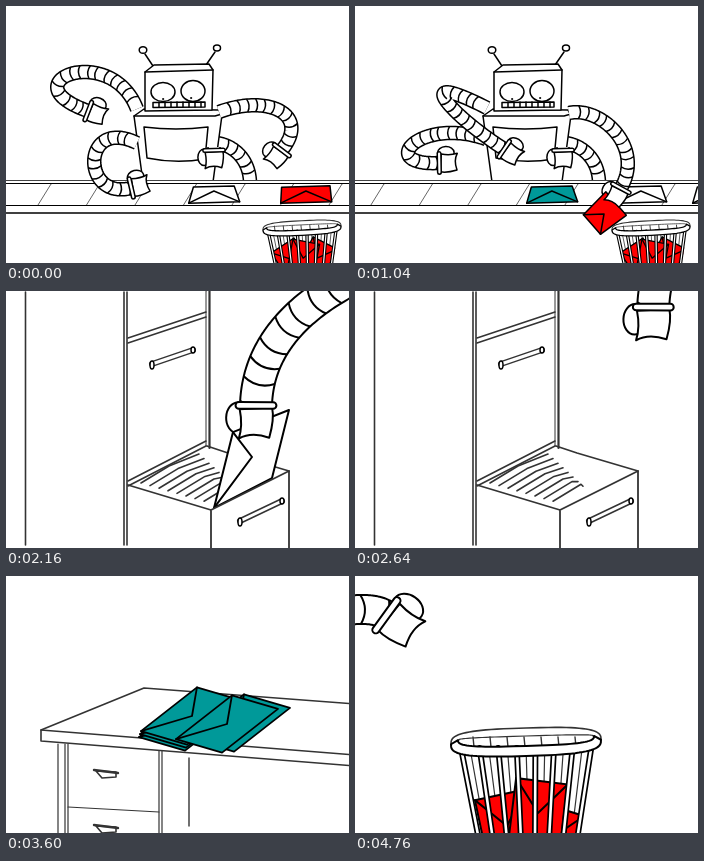
An HTML page with a canvas for the animation above (4840 ms loop, 343x257 px).

```html
<!DOCTYPE html>
<html lang="en">
<head>
<meta charset="utf-8">
<title>Sorting robot</title>
<style>
html, body { margin: 0; width: 100%; height: 100%; overflow: hidden; background: #fff; }
canvas { display: block; width: 100vw; height: 100vh; }
</style>
</head>
<body>
<canvas id="stage" width="343" height="257"></canvas>
<script>
const ctx = document.getElementById('stage').getContext('2d');
const LOOP = 4840, CABINET = 1760, DESK = 2880, BIN = 3720;
const RED = '#f00', TEAL = '#099', WHITE = '#fff', INK = '#000', GREY = '#333';

// ---------- motion helpers ----------
const mix = (a, b, k) => a.map((v, i) => v + (b[i] - v) * k);
const shift = (p, dx, dy) => p.map((v, i) => v + (i % 2 ? dy : dx));

function ease(t, from, to) {
  const k = Math.max(0, Math.min(1, (t - from) / (to - from)));
  return k * k * (3 - 2 * k);
}

// Eases through a series of moves, each given as [from, to, values].
const blend = (t, start, ...moves) =>
  moves.reduce((now, [from, to, goal]) => mix(now, goal, ease(t, from, to)), start);

// ---------- drawing helpers ----------
function trace(p) {
  ctx.beginPath();
  for (let i = 0; i < p.length; i += 2) ctx.lineTo(p[i], p[i + 1]);
}
function stroke(w, color = INK) {
  ctx.lineWidth = w;
  ctx.strokeStyle = color;
  ctx.stroke();
}
function paint(fill, w, color) {
  ctx.closePath();
  ctx.fillStyle = fill;
  ctx.fill();
  stroke(w, color);
}
function path(p, w = 1.5, color = INK) { trace(p); stroke(w, color); }
function shape(p, fill = WHITE, w = 1.5, color = INK) { trace(p); paint(fill, w, color); }
function oval(x, y, rx, ry, w = 1.5, fill = WHITE) {
  ctx.beginPath();
  ctx.ellipse(x, y, rx, ry, 0, 0, 7);
  paint(fill, w);
}
function group(draw) {
  ctx.save();
  draw();
  ctx.restore();
}

// A letter lies with its flap edge at the bottom; skew slides and taper narrows the far edge.
function letter([x, y, w, h, angle, skew = 0, taper = 1, apex = 0.5], fill = WHITE, lw = 1.5) {
  group(() => {
    ctx.translate(x, y);
    ctx.rotate(angle * Math.PI / 180);
    const far = w * taper / 2, near = w / 2, s = skew / 2;
    shape([s - far, -h / 2, s + far, -h / 2, near - s, h / 2, -near - s, h / 2], fill, lw);
    path([near - s, h / 2, skew * (apex - 0.5), h * (0.5 - apex), -near - s, h / 2], lw);
  });
}

// ---------- arms: a Bezier tube ending in a gripper ----------
function bezier(p, u) {
  const v = 1 - u;
  return [0, 1].map(k =>
    v * v * v * p[k] + 3 * v * v * u * p[2 + k] + 3 * v * u * u * p[4 + k] + u * u * u * p[6 + k]);
}

function tube(curve, width, gap, w) {
  const points = Array.from({ length: 61 }, (_, i) => bezier(curve, i / 60));
  ctx.lineCap = 'butt';
  path(points.flat(), width + w);
  path(points.flat(), width - w, WHITE);
  let run = 0;
  for (let i = 1; i < points.length; i++) {
    const [x, y] = points[i], dx = x - points[i - 1][0], dy = y - points[i - 1][1];
    const len = Math.hypot(dx, dy);
    run += len;
    if (run < gap) continue;
    run -= gap;
    const ux = dx / len, uy = dy / len, h = width / 2;
    ctx.beginPath();
    ctx.moveTo(x - uy * h, y + ux * h);
    ctx.quadraticCurveTo(x + ux * h * 0.6, y + uy * h * 0.6, x + uy * h, y - ux * h);
    stroke(w);
  }
  ctx.lineCap = 'round';
}

function gripper(x, y, angle, size, side, w, item) {
  const local = draw => group(() => {
    ctx.translate(x, y);
    ctx.rotate(angle);
    ctx.scale(size, size * side);
    draw(w / size);
  });
  local(lw => oval(14, 19, 16, 12, lw));
  if (item) item();
  local(lw => {
    ctx.beginPath();
    ctx.moveTo(2, -17);
    ctx.quadraticCurveTo(14, -20, 34, -15);
    ctx.quadraticCurveTo(28, 4, 36, 17);
    ctx.quadraticCurveTo(22, 13, 5, 17);
    paint(WHITE, lw);
    path([0, -18, 1, 18], 7 + lw);
    path([0, -18, 1, 18], 7 - lw, WHITE);
  });
}

function arm(curve, side, item, width = 13, gap = 9, size = 0.52, w = 1.5) {
  const [, , , , cx, cy, x, y] = curve;
  tube(curve, width, gap, w);
  gripper(x, y, Math.atan2(y - cy, x - cx), size, side, w, item);
}

// ---------- bin ----------
function rim(rx, ry, cy, from, to) {
  const bulge = v => Math.sign(v) * Math.abs(v) ** 0.65, p = [];
  for (let i = 0; i <= 40; i++) {
    const a = (from + (to - from) * i / 40) * Math.PI, x = rx * bulge(Math.cos(a));
    p.push(171 + x, cy + ry * bulge(Math.sin(a)) - x * 0.03);
  }
  return p;
}

function bin(papers, w, falling) {
  path(rim(75, 14, 166, 1, 2), w * 0.8, GREY);
  path(rim(67, 2, 162, 1, 2), w * 0.6, GREY);
  for (let x = 118; x < 230; x += 17) path([x, 161, x + 1, 171], w * 0.7, GREY);
  for (let i = 0; i < 15; i++) path([106 + i * 9.3, 174, 124 + i * 7.1, 262], w * 0.6, GREY);
  if (falling) falling();
  group(() => {
    trace([103, 174, 240, 174, 223, 264, 122, 264]);
    ctx.clip();
    for (const [x, y, tilt] of papers) letter([x, y, 52, 64, 180 + tilt], RED, w);
  });
  for (let i = 0; i < 8; i++) {
    const slat = [106 + i * 18.6, 172, 124 + i * 14, 264];
    path(slat, 4 + w);
    path(slat, 4 - w * 0.7, WHITE);
  }
  shape([...rim(75, 14, 166, 0, 1), ...rim(68, 8, 162, 1, 0)], WHITE, w);
}

// ---------- robot at the belt ----------
const leftTop = {
  rest: [131, 103, 105, 35, 0, 76, 82, 105],
  reach: [132, 102, 50, 60, 100, 112, 149, 143],
  lift: [131, 103, 100, 40, 28, 150, 65, 91]
};
const leftLow = {
  grab: [131, 137, 75, 110, 75, 195, 125, 182],
  fling: [131, 135, 90, 110, 50, 130, 20, 160],
  rest: [131, 133, 65, 110, 20, 160, 84, 157]
};
const rightTop = {
  rest: [213, 106, 262, 88, 305, 108, 276, 144],
  grab: [213, 106, 250, 95, 300, 130, 268, 174],
  hold: [214, 107, 245, 100, 290, 140, 266, 182]
};
const forearm = {
  rest: [208, 141, 208, 141, 208, 141, 208, 144],
  grab: [244, 176, 228, 152, 200, 158, 190, 176]
};

// Letters ride the belt with a narrower far edge.
const onBelt = (x, t, taper = 0.8) => [x - 0.176 * t, 188.5, 51, 16, -1.5, 0, taper, 0.72];

function body() {
  path([139, 48, 147, 60]);
  path([209, 46, 200, 59]);
  oval(137, 44, 3.8, 3.3);
  oval(211, 42, 3.5, 3);
  shape([128, 110, 138, 103, 213, 104, 216, 109, 207, 176, 137, 176]);
  path([128, 110, 209, 110, 216, 108]);
  ctx.beginPath();
  ctx.moveTo(138, 121);
  ctx.quadraticCurveTo(170, 125, 202, 121);
  ctx.lineTo(199, 153);
  ctx.quadraticCurveTo(170, 158, 141, 152);
  ctx.closePath();
  stroke(1.5);
  shape([139, 66, 148, 59, 203, 58, 207, 64, 206, 104, 139, 105]);
  path([139, 66, 207, 64]);
  oval(157, 86, 12, 9.5);
  oval(187, 85, 12, 10.5);
  oval(157, 93, 0.6, 0.4, 1, INK);
  oval(185, 92, 0.6, 0.4, 1, INK);
  shape([147, 96.5, 199, 96, 199, 101, 147, 101.5]);
  for (let x = 153; x < 198; x += 6) path([x, 96, x, 101]);
}

function belt(t) {
  ctx.fillStyle = WHITE;
  ctx.fillRect(0, 174, 343, 33);
  const first = 45 - (t * 0.202) % 48.5;
  for (let x = first - 48.5; x < 400; x += 48.5) path([x, 178, x - 13, 199], 1, '#666');
  path([0, 174.5, 343, 174.5], 1, '#444');
  path([0, 177.5, 343, 177.5], 1);
  path([0, 199.5, 343, 199.5], 1.2);
  path([0, 207, 343, 207], 1.4);
}

function robotScene(t) {
  tube([211, 137, 230, 140, 245, 156, 244, 180], 13, 9, 1.5);
  body();
  belt(t);
  for (const x of [469, 546]) letter(onBelt(x, t));
  letter(onBelt(624, t, 0.95), RED);

  const white = blend(t, onBelt(208, t), [400, 700, [-45, 168, 51, 16, -20, 0, 0.8, 0.72]]);
  const teal = blend(t, onBelt(380, t), [1200, 1600, [62, 75, 61, 17, 122, 0, 0.5, 0.5]]);
  const held = [249, 208, 26, 32, 49, 0, 1.2, 0.5];
  const overBin = [285, 210, ...held.slice(2)], inBin = [290, 270, ...held.slice(2)];
  const red = blend(t, onBelt(300, t, 0.95), [240, 640, held], [1080, 1240, overBin], [1240, 1400, inBin]);
  const dropped = t > 1240;

  arm(blend(t, leftLow.grab, [400, 700, leftLow.fling], [700, 960, leftLow.rest]), -1, () => letter(white));
  arm(blend(t, leftTop.rest, [560, 1040, leftTop.reach], [1080, 1200, shift(leftTop.reach, 3, 8)],
    [1200, 1600, leftTop.lift]), -1, () => letter(teal, TEAL));
  arm(blend(t, forearm.rest, [1120, 1560, forearm.grab]), 1, null, 12, 8);
  arm(blend(t, rightTop.rest, [0, 240, rightTop.grab], [240, 640, rightTop.hold],
    [1080, 1240, shift(rightTop.hold, 26, 2)], [1240, 1560, rightTop.rest]), 1,
    dropped ? null : () => letter(red, RED));

  group(() => {
    ctx.translate(296, 222);
    ctx.rotate(-0.02);
    ctx.scale(0.52, 0.52);
    ctx.translate(-171, -166);
    const falling = () => letter([171, 166 + (t - 1240) * 0.8, 50, 62, 49], RED, 2.5);
    bin([[200, 224, 28], [150, 226, -32], [172, 224, 12]], 2.5, dropped && t < 1400 && falling);
  });
}

// ---------- filing cabinet ----------
function handle(x, y, dx, dy) {
  path([x, y, x + dx, y + dy], 6, GREY);
  path([x, y, x + dx, y + dy], 3, WHITE);
  oval(x, y + 1, 2, 4);
  oval(x + dx, y + dy, 2, 3);
}

function cabinetScene(t) {
  const offset = blend(t, [85, -190], [0, 400, [0, 0]], [400, 560, [0, 22]], [640, 1080, [85, -190]]);
  const fall = 22 + 85 * ease(t, 560, 720);
  for (const x of [19.5, 118, 121]) path([x, 1, x, 254], 1.6, GREY);
  path([203.5, 0, 203.5, 157], 2.2, GREY);
  path([200, 0, 200, 155], 1, GREY);
  for (const y of [0, 5]) {
    path([122, 47 + y, 200, 21 + y], 1.6, GREY);
    path([122, 190 + y, 200, 150 + y], 1.6, GREY);
  }
  handle(146, 73, 41, -14);
  path([122, 194, 205, 219], 1.8, GREY);
  path([201, 155, 222, 162, 283, 180], 1.8, GREY);
  for (let i = 0; i < 8; i++) {
    const x = 135 + i * 9, y = 192 + i * 2.6;
    path([x, y, x + 28, y - 17, x + 58 - i * 4, y - 29 + i * 2], 1.6, GREY);
  }

  const held = t < 560, [dx, dy] = held ? offset : [0, fall];
  const white = () => group(() => {
    trace([0, -10, 360, -10, 360, 180, 283, 180, 205, 219, 0, 219]);
    ctx.clip();
    letter([246 + dx, 166 + dy, 78, 49, 104, -39, 0.9], WHITE, 2);
  });
  if (!held) white();
  arm(shift([400, -35, 300, 0, 252, 50, 250, 114], ...offset), 1, held && white, 32, 20, 0.95, 2);

  shape([205, 219, 283, 180, 283, 262, 205, 262], WHITE, 1.8, GREY);
  handle(234, 230, 42, -20);
}

// ---------- desk ----------
function deskScene(t) {
  for (const x of [52, 59, 62, 153, 156]) path([x, 168, x, 257], 1.2, GREY);
  path([183, 182, 183, 250], 1.4, GREY);
  path([62, 231, 153, 236], 1.2, GREY);
  for (const y of [198, 253]) {
    path([90, y - 3, 110, y - 2, 110, y + 3, 96, y + 4, 90, y - 3], 1.6, GREY);
    path([88, y - 4, 112, y - 1], 2.4, GREY);
  }
  shape([35, 154, 138, 112, 350, 128, 350, 190, 35, 165], WHITE, 1.6, GREY);
  path([35, 154, 350, 179], 1.6, GREY);

  const teal = (x, y) => letter([x, y, 71, 39, 142, -28], TEAL, 1.8);
  teal(233, 147);
  for (let i = 0; i < 3; i++) teal(184 + i, 146 - i * 3);

  const offset = blend(t, [-150, 60], [0, 240, [0, 0]], [240, 400, [4, -3]], [400, 720, [-230, 60]]);
  const placed = t > 400, [dx, dy] = placed ? [4, -3] : offset;
  const top = () => teal(217 + dx, 151 + dy);
  if (placed) top();
  arm(shift([-40, 196, 60, 222, 160, 235, 184, 184], ...offset), 1, !placed && top, 21, 22, 0.8, 2);
}

// ---------- close view of the bin ----------
function binScene(t) {
  const hold = [-30, 55, 20, 18, 85, 25, 100, 57], away = [-60, 40, -30, 40, 12, 26, 31, 39];
  const pose = blend(t, shift(hold, -150, -30), [0, 320, hold], [320, 480, shift(hold, 18, 23)],
    [640, 1040, away]);
  const [dx, dy] = blend(t, [-150, -30], [0, 320, [0, 0]], [320, 480, [18, 23]], [480, 720, [42, 130]]);
  const free = t > 480, landed = t >= 720;
  const red = () => letter([129 + dx, 109 + dy, 89, 55, -118, 24], RED, 2);
  const papers = [[195, 263, 17], [152, 250, -12]];
  if (landed) papers.push([183, 237, 7]);
  bin(papers, 2, free && !landed && red);
  arm(pose, -1, !free && red, 29, 22, 1, 2);
}

// ---------- clock ----------
const step = (t, size) => Math.floor(t / size) * size;

function render(t) {
  ctx.fillStyle = WHITE;
  ctx.fillRect(0, 0, 343, 257);
  ctx.lineJoin = ctx.lineCap = 'round';
  if (t < CABINET) robotScene(step(t, 40));
  else if (t < DESK) cabinetScene(step(t - CABINET, 80));
  else if (t < BIN) deskScene(step(t - DESK, 80));
  else binScene(step(t - BIN, 80));
}

let origin;
function frame(now) {
  origin ??= now;
  render((now - origin) % LOOP);
  requestAnimationFrame(frame);
}
requestAnimationFrame(frame);
</script>
</body>
</html>
```
